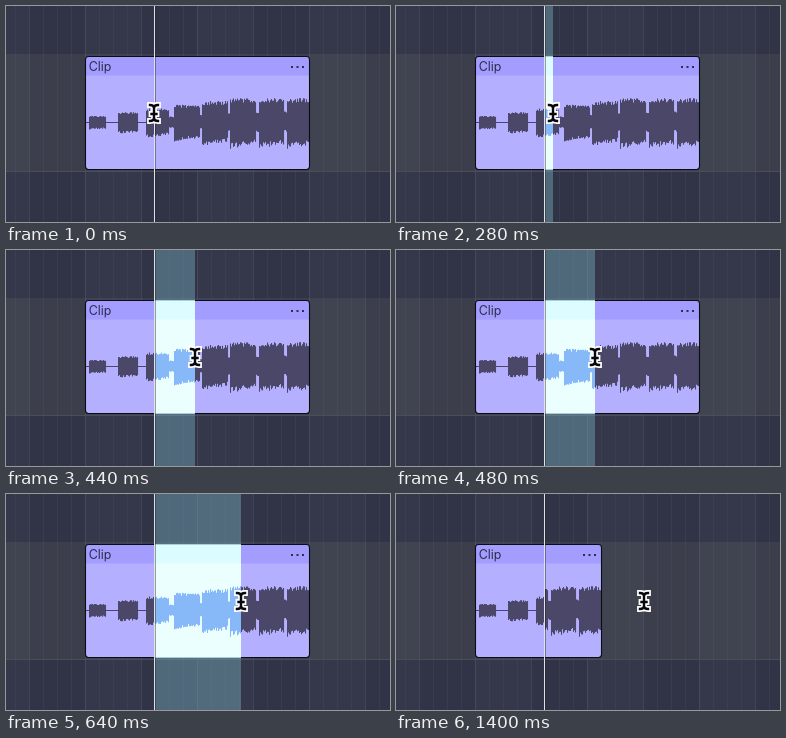
Write an HTML page with a canvas that moves like this. It is 384 px wide and 216 px high and loops after 2000 ms.

```html
<!DOCTYPE html>
<html lang="en">
<head>
<meta charset="utf-8">
<title>Cut clip selection</title>
<style>
html, body { margin: 0; width: 100%; height: 100%; overflow: hidden; background: #34374a; }
canvas { display: block; width: 384px; height: 216px; }
</style>
</head>
<body>
<canvas id="stage"></canvas>
<script>
const W = 384, H = 216, LOOP = 2000, STEP = 40, CUT_TIME = 1400;
const DRAG = { from: 160, to: 790, x: 148.5, distance: 100 };
const SEL_X = 149, CUT = 98;
const CLIP = { x: 79.5, y: 50.5, w: 224, h: 113, header: 19 };
const MID = 116.5, CELL = 14, BEAT = 56;

const PLAIN = { body: '#b4b0ff', head: '#a29dff', wave: '#4a4768', edge: '#0c0c14' };
const PICKED = { body: '#ecffff', head: '#dcfdff', wave: '#87b8f8', edge: '#a9d0d8' };
const INK = '#302e4c';

const canvas = document.getElementById('stage');
const scale = window.devicePixelRatio || 1;
canvas.width = W * scale;
canvas.height = H * scale;
const ctx = canvas.getContext('2d');
ctx.scale(scale, scale);

function seeded(seed) {
  return () => {
    seed = (seed * 1664525 + 1013904223) % 4294967296;
    return seed / 4294967296;
  };
}

// One burst every 28.2px, growing in length and loudness, joined by a quieter neck
function buildWave() {
  const rand = seeded(29), pitch = 28.2;
  const path = new Path2D();
  path.rect(80, MID - 0.5, 223, 1);
  for (let x = 83; x < 303; x++) {
    const k = Math.floor((x - 83) / pitch);
    const along = x - 83 - k * pitch;
    const length = Math.min(17 + 3 * k, 25.5);
    const inBurst = along < length;
    if (!inBurst && k < 2) continue;
    const level = Math.min(6.4 + 3.6 * k, 23.5) * (inBurst ? 1 : 0.45);
    const top = level * (0.84 + 0.2 * rand());
    const bottom = level * (1.06 - 0.2 * along / pitch) * (0.82 + 0.24 * rand());
    path.rect(x, MID - top, 1.05, top + bottom);
  }
  return path;
}
const wave = buildWave();

function rect(color, x, y, w, h) {
  ctx.fillStyle = color;
  ctx.fillRect(x, y, w, h);
}

function clipped(x, w, draw) {
  ctx.save();
  ctx.beginPath();
  ctx.rect(x, 0, w, H);
  ctx.clip();
  draw();
  ctx.restore();
}

function drawGrid() {
  rect('#34384a', 0, 0, W, H);
  rect('#404350', 0, 48, W, 117);
  for (let x = 23; x < W; x += 2 * BEAT) rect('rgba(24,26,40,.1)', x, 0, BEAT, H);
  for (let x = 9; x < W; x += CELL) {
    const onBeat = (x - 23) % BEAT === 0;
    rect(`rgba(150,155,175,${onBeat ? 0.16 : 0.08})`, x, 0, 1, H);
  }
  rect('#4b4d59', 0, 165, W, 1);
}

function clipShape(w) {
  ctx.beginPath();
  ctx.roundRect(CLIP.x, CLIP.y, w, CLIP.h, 3);
}

function paintBody(colors, w) {
  ctx.save();
  clipShape(w);
  ctx.clip();
  rect(colors.body, CLIP.x, CLIP.y, w, CLIP.h);
  rect(colors.head, CLIP.x, CLIP.y, w, CLIP.header);
  ctx.restore();
}

function paintWave(color, shift = 0) {
  ctx.save();
  ctx.translate(-shift, 0);
  ctx.fillStyle = color;
  ctx.fill(wave);
  ctx.restore();
}

function outline(color, w) {
  clipShape(w);
  ctx.strokeStyle = color;
  ctx.lineWidth = 1.1;
  ctx.stroke();
}

function drawClip(cut) {
  const w = CLIP.w - (cut ? CUT : 0);
  const right = CLIP.x + w;
  paintBody(PLAIN, w);
  clipped(0, SEL_X, () => paintWave(PLAIN.wave));
  clipped(SEL_X, right - SEL_X, () => paintWave(PLAIN.wave, cut ? CUT : 0));
  ctx.fillStyle = INK;
  ctx.font = '12.4px Inter, "Liberation Sans", sans-serif';
  ctx.fillText('Clip', 82.7, 65);
  for (let i = 0; i < 3; i++) rect(INK, right - 18.5 + 5.5 * i, 60, 2, 2);
  outline(PLAIN.edge, w);
}

function drawSelection(to) {
  clipped(SEL_X, to - SEL_X, () => {
    rect('rgba(126,186,204,.39)', SEL_X, 0, to - SEL_X, H);
    paintBody(PICKED, CLIP.w);
    paintWave(PICKED.wave);
    outline(PICKED.edge, CLIP.w);
  });
}

function drawPlayhead() {
  rect('#e2e2e6', 148, 0, 1, H);
  rect('rgba(20,20,32,.4)', 149, 0, 1, H);
}

function drawPointer(x, y) {
  const p = new Path2D('M-4-8Q0-8 0-5Q0-8 4-8M0-5V5M-4 8Q0 8 0 5Q0 8 4 8M-2.5 1H2.5');
  ctx.save();
  ctx.translate(x, y);
  ctx.lineCap = 'square';
  ctx.lineJoin = 'round';
  for (const [color, width] of [['#fff', 5.8], ['#08080c', 2.4]]) {
    ctx.strokeStyle = color;
    ctx.lineWidth = width;
    ctx.stroke(p);
  }
  ctx.restore();
}

function pointerX(t) {
  const k = Math.min(Math.max((t - DRAG.from) / (DRAG.to - DRAG.from), 0), 1);
  return Math.floor(DRAG.x + DRAG.distance * (1 - Math.cos(Math.PI * k)) / 2);
}

function render(time) {
  const t = Math.floor((time % LOOP) / STEP) * STEP;
  const cut = t >= CUT_TIME;
  const x = pointerX(t);

  drawGrid();
  drawClip(cut);
  if (!cut && x > SEL_X) drawSelection(x);
  drawPlayhead();
  drawPointer(x, 107);
}

const start = performance.now();
function tick() {
  render(performance.now() - start);
  requestAnimationFrame(tick);
}
tick();
</script>
</body>
</html>
```
